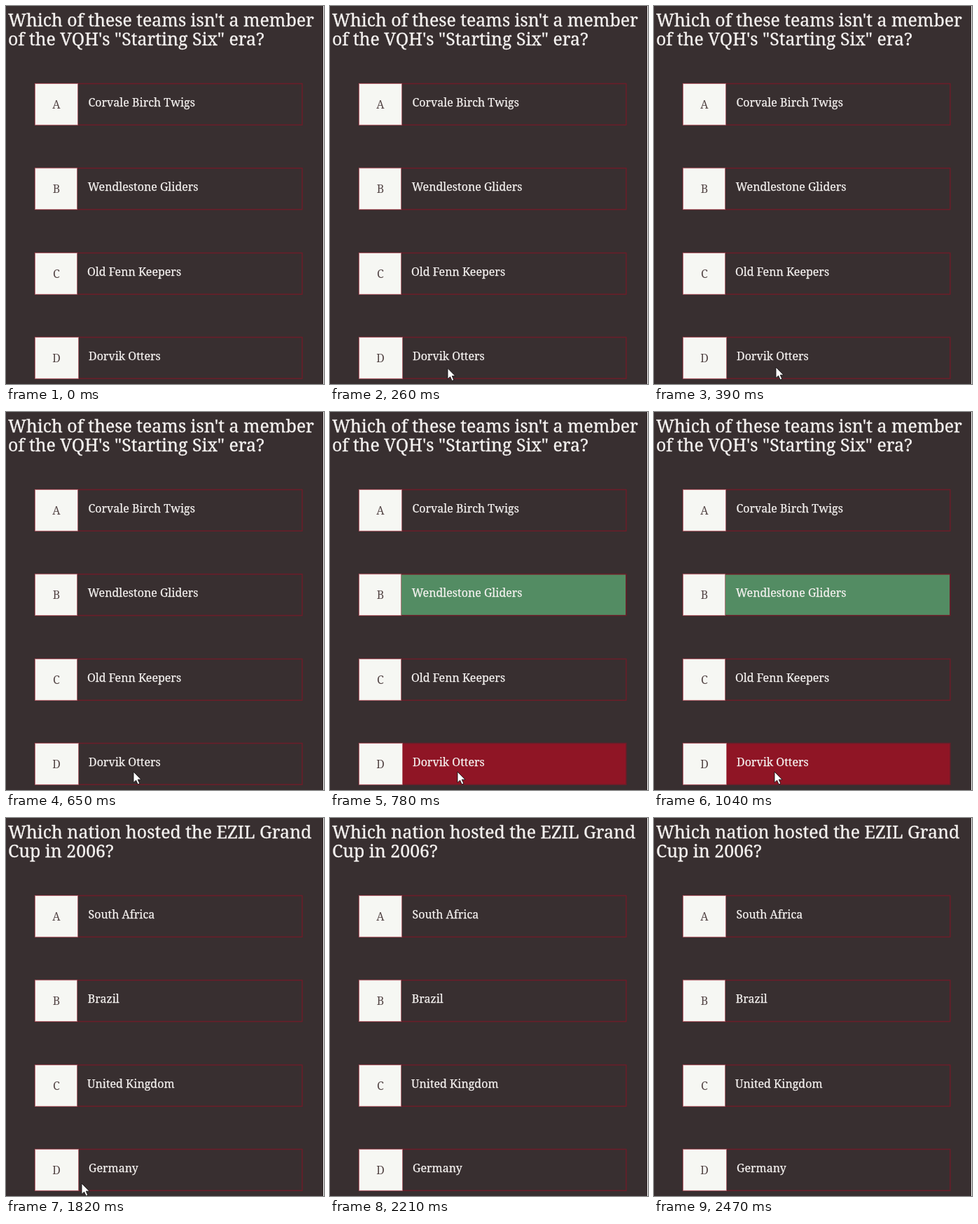
Recreate the animation shown at these times as an HTML page. Size 454 px wide and 538 px high, loop 3120 ms.

```html
<!DOCTYPE html>
<html lang="en">
<head>
<meta charset="utf-8">
<title>Quiz</title>
<style>
  html, body { margin: 0; width: 100%; height: 100%; overflow: hidden; background: #fff; }
  svg { display: block; width: 454px; height: 538px; }
  text { font-family: "Noto Serif", serif; fill: #f5f2f0; }
  .title { font-size: 24.9px; stroke: #f5f2f0; stroke-width: 0.3px; }
  .answer { font-size: 16px; stroke: #f5f2f0; stroke-width: 0.25px; }
  .letter { font-size: 16px; fill: #544646; text-anchor: middle; }
</style>
</head>
<body>
<svg id="stage" viewBox="0 0 454 538">
  <rect width="453" height="538" fill="#382f30"/>
  <text class="title" x="3" y="28.5"></text>
  <text class="title" x="3" y="55.5"></text>
  <g id="rows"></g>
  <path id="cursor" d="M0 0V15.5L3.6 12.2L6.2 18L8.8 16.8L6.3 11.2H11Z"
        fill="#fff" stroke="#151112" stroke-width="0.9"/>
</svg>
<script>
const LOOP = 3120, REVEAL = 780, NEXT = 1820;
const GREEN = "#538c63", RED = "#8f1525";

const questions = [
  { title: ["Which of these teams isn't a member", "of the VQH's \"Starting Six\" era?"],
    answers: ["Corvale Birch Twigs", "Wendlestone Gliders", "Old Fenn Keepers", "Dorvik Otters"] },
  { title: ["Which nation hosted the EZIL Grand", "Cup in 2006?"],
    answers: ["South Africa", "Brazil", "United Kingdom", "Germany"] }
];

// Cursor stops: time, x, y; a stop without a position hides it.
const stops = [
  [0], [130, 159, 526], [260, 168, 515.5], [390, 174, 514], [520, 179, 513],
  [650, 182, 512], [910, 177, 512], [1040, 172, 512], [1820, 108, 520], [1950]
];

const rowLayout = [
  { y: 110.5, split: 102.5, textX: 117.5 },
  { y: 230.8, split: 101.5, textX: 116.8 },
  { y: 351.5, split: 101.5, textX: 116 },
  { y: 471.5, split: 103.5, textX: 118 }
];

const stage = document.getElementById("stage");
const rowGroup = document.getElementById("rows");
const cursor = document.getElementById("cursor");
const titles = stage.querySelectorAll(".title");

function add(name, attributes, content = "") {
  const node = document.createElementNS("http://www.w3.org/2000/svg", name);
  for (const key in attributes) node.setAttribute(key, attributes[key]);
  node.textContent = content;
  return rowGroup.appendChild(node);
}

const rows = rowLayout.map(({ y, split, textX }, i) => {
  const fill = add("rect", { x: 41.5, y, width: 381.3, height: 58.8,
    fill: "none", stroke: "#6c1d29", "stroke-width": 1.5 });
  add("rect", { x: 41.5, y, width: split - 41.5, height: 58.8,
    fill: "#f6f7f3", stroke: "#b5636c", "stroke-width": 0.8 });
  add("text", { class: "letter", x: 72, y: y + 35.5 }, "ABCD"[i]);
  const label = add("text", { class: "answer", x: textX, y: y + 32.5 });
  return { fill, label };
});

function draw(time) {
  const { title, answers } = questions[time < NEXT ? 0 : 1];
  const revealed = time >= REVEAL && time < NEXT;
  titles.forEach((line, i) => line.textContent = title[i]);
  rows.forEach(({ fill, label }, i) => {
    label.textContent = answers[i];
    fill.setAttribute("fill", revealed ? ["none", GREEN, "none", RED][i] : "none");
  });

  const [, x, y] = stops.filter(stop => stop[0] <= time).pop();
  cursor.setAttribute("visibility", x === undefined ? "hidden" : "visible");
  if (x !== undefined) cursor.setAttribute("transform", `translate(${x} ${y})`);
}

const start = performance.now();
function tick() {
  draw((performance.now() - start) % LOOP);
  requestAnimationFrame(tick);
}
tick();
</script>
</body>
</html>
```
